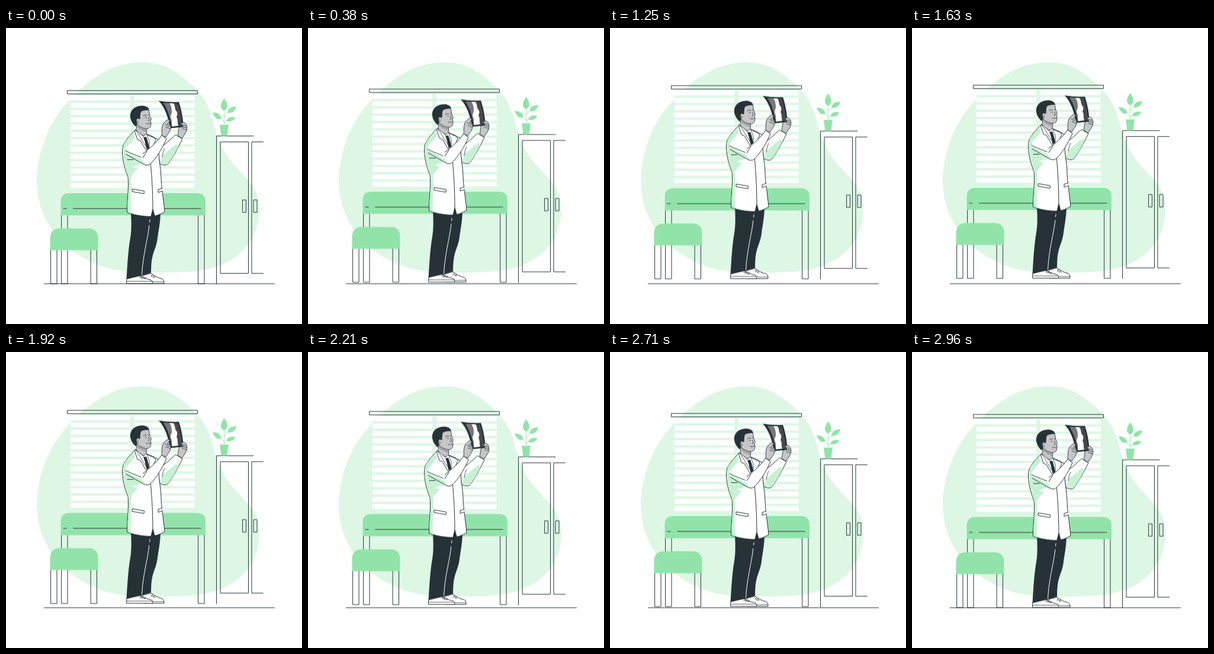
An HTML page for the animation above (3 s loop, 500 by 500 pixels).

```html
<!DOCTYPE html>
<html lang="en">
<head>
<meta charset="utf-8">
<title>Doctor with film</title>
<style>
  html, body { margin: 0; width: 100%; height: 100%; overflow: hidden; background: #fff; }
  svg { display: block; width: 100vw; height: 100vh; }
  .float { animation: float 3s linear infinite; }
  @keyframes float { 50% { transform: translateY(-10px); } }
  .pale { fill: #def7e5; }
  .shade { fill: #c8f1d4; }
  .green { fill: #92e3a9; }
  .dark { fill: #263238; }
  .white { fill: #fff; }
  .line { fill: none; stroke: #263238; stroke-linecap: round; stroke-linejoin: round; }
  .box { fill: #fff; stroke: #263238; stroke-linejoin: round; }
  .skin { fill: #c6c6c8; stroke: #263238; stroke-width: .9; stroke-linejoin: round; }
  .stem { fill: none; stroke: #b8ecc6; stroke-width: 1.1; }
  .thin { stroke-width: .8; }
</style>
</head>
<body>
<svg viewBox="0 0 500 500">
  <defs>
    <pattern id="slats" x="109" y="113.6" width="210" height="12.35" patternUnits="userSpaceOnUse">
      <rect width="210" height="8.2" fill="#fff"/>
    </pattern>
  </defs>

  <path class="pale" d="M230 58C263 58 281 69 301 85C330 109 342 127 350 158C357 190 369 213 389 235C409 257 428 272 428 305C428 344 410 379 367 399C337 412 302 413 262 413C219 413 180 413 146 396C112 380 91 361 77 340C61 315 52 290 52 256C53 214 69 164 100 130C134 91 175 58 230 58Z"/>
  <path class="line" d="M64.500 432H453.500"/>

  <g class="float">
  <g transform="translate(0 .4)">
    <!-- window -->
    <path class="pale" d="M109 112H318.500V270H109Z"/>
    <path fill="url(#slats)" d="M109 113H318.500V270H109Z"/>
    <path class="pale" d="M210 112H217V270H210Z"/>
    <path class="line" d="M104 105.300H323.500V111H104Z"/>

    <!-- cabinet -->
    <path class="line" d="M418 182H355.500V432M362.500 192H409.500V414H362.500ZM434.500 192H415V414H434.500M400 290H405.500V311H400ZM418.500 290H424V311H418.500Z"/>

    <!-- plant -->
    <path class="stem" d="M368.500 164V137M368.500 160Q367 154 361 151M368.500 152Q369 145 376 141M368.500 161Q370 157 375 155"/>
    <g class="green">
      <path d="M361 163H376L373.500 182H363.500Z"/>
      <path d="M368.500 118.500C372 123 374 127 373.700 131C373.500 136 371 138 368.500 139C365.500 138 363 135 363 131C363 127 365.500 123 368.500 118.500Z"/>
      <path d="M349 142.500C357 142 363 146 363.500 153C356 155 352 150 349 142.500Z"/>
      <path d="M389 132.500C387 140 382 144 374.500 142.500C374.500 136 380 132 389 132.500Z"/>
      <path d="M387.500 150.500C384 157 378 159 372 156.500C374 150.500 380 148.500 387.500 150.500Z"/>
    </g>

    <!-- table and stool -->
    <path class="line" d="M94 315H104V431.600H94ZM325 315H335V431.600H325Z"/>
    <path class="green" d="M92.500 316V293Q92.500 278.500 107 278.500H322.500Q337 278.500 337 293V316Z"/>
    <path class="line" d="M97 304.600H102M113.500 304.600H329"/>
    <path class="line" d="M76 374H86V431.600H76ZM143.500 374H153.500V431.600H143.500Z"/>
    <path class="green" d="M74.500 375V355Q74.500 338 91.500 338H139Q155.500 338 155.500 355V375Z"/>

    <!-- shoes -->
    <path class="box" d="M229 418L245 414C250 418 256 421.500 263 423C266 424 267 427 267 431.300H232Z"/>
    <path class="box" d="M204 423L226 417C231 421 237 423.500 244 425C247 426 248 428 247.500 431.300H203.500Q203 427 204 423Z"/>
    <path class="line thin" d="M203.500 427.500H247.500M248 428.500H267M226 421.500L229 418M229 423L232 419M233 424L236 420.500M245 419.500L248 416M248.500 421.500L251 418M226 420L235 423.500M245 417.500L252 421.500"/>

    <!-- trousers -->
    <path class="dark" d="M211 312C212 328 212 343 210 354C206 377 205 402 203.500 424Q215 421 229 418L245 413C245 399 246 391 248 383C251 373 255 365 256 354C258 340 260.500 328 261 312Z"/>
    <path fill="none" stroke="#fff" d="M243 323L242.500 328M241.800 333C240 355 231 383 229.500 417"/>

    <!-- far arm -->
    <path class="box" d="M256 205C266 198 278 189 286 180L298 187C290 203 281 220 273 230Q269 233 260 229Z"/>
    <path class="shade" d="M260 228L264 215L288 195L291 200C285 212 279 222 273 229.500Q268 232 260 228Z"/>
    <path class="line thin" d="M264 217Q265 208 268 203"/>

    <!-- coat -->
    <path class="box" d="M218 172C211 180 202 188 198 198C194 208 198 232 206 251C208 270 204 292 204.500 311C215 315 230 318 245 318L248 306L251 317C257 316 263 313 268 310C266 288 262 266 262 252C262 238 258 224 258 208L257 188L236 179Z"/>
    <path class="shade" d="M215 177C208 184 201 190 198.500 198C195 209 199 232 206.500 250C209 268 205 290 205 310.500L211 312.500C210 289 212 270 211 250L223 236L214 234L230 228L203 213L202 203L218 184Z"/>
    <path class="dark" d="M244.500 318L248 305L251.500 317Z"/>
    <path class="line" d="M242 207C246 240 248 275 248 306"/>
    <path class="box" d="M213 271.500L233.500 275L233 279.500L213 276ZM264 270.500L257 272.500V277.500L264.500 275"/>

    <!-- neck, shirt and tie -->
    <path class="skin" d="M221 160C221 166 220 170 219 173L232 182L237 180L238 167Z"/>
    <path fill="#a3a3a6" d="M222 163C226 168 232 170.500 237.500 171L237 175C231 174 225 170 221.500 167Z"/>
    <path class="box thin" d="M219 171L232 183L237 178L242 190V207L232 193Z"/>
    <path class="dark" d="M232 184L237 183.500L239 189L242.500 203L238 207L234.500 191Z"/>
    <path class="line" d="M217 173L222 188L227 190L237 207M238 179L250 184L253 189L244 207"/>

    <!-- near arm -->
    <path class="white" d="M202 207L226 213C240 205 254 194 263 180.500L271 187C263 205 253 221 245 228Q240 233 233 229L203 212Z"/>
    <path class="shade" d="M203 209L229 222L236 229L231 228L203 214Z"/>
    <path class="line" d="M202 207C212 212 221 215 228 218M205 222H215M203 213L232 229.500Q240 234 245 228C253 220 263 205 271 187L263 180.500C255 193 243 203 231 212M231 219L238 208"/>

    <!-- head -->
    <path class="skin" d="M222 142C228 138 238 137 241 137.500C242.500 142 242 147 243.500 149L245.500 154L244 156.500C245.500 160 245 164 243.500 167C241 170.500 235 170.500 230 168C225 166 221 163 220 158Z"/>
    <path class="dark" d="M219 166C212 160 208 150 210.500 143C213 134 224 129.800 233 131C239 132 242 135.500 241.500 138.500C237 138 231 139 228 141C226 146 227.500 150 226 154C222 151 218 154 221 158C222 161 221 164 219 166Z"/>
    <path class="line thin" d="M232 148Q235 145.500 237.500 147M240 146.500H242M235 150.500L237.500 151M240.800 150.500L242 155.500L240 156.500M237 161Q240 162.500 244 160.500M222 156Q224 157 223 160"/>

    <!-- film -->
    <path class="dark" d="M258 122.500Q275 125.500 292 124.500C297 139 299 154 300 166.500L277 169C274 150 269 135 258 122.500Z"/>
    <path fill="#77777a" d="M266 126L290 127.500C294 140 296 153 297 164L280 166C277 149 273 137 266 126Z"/>
    <path fill="#48494c" d="M283 127L290 127.500C294 140 296 153 297 164L289 165Z"/>
    <path class="white" d="M276 126.500L283 127C286 131 285 136 287 139C291 143 289 147 288 150C291 154 289 160 291 164.500L280.500 166C279.500 160 281 156 278.500 152C276.500 148 281 144 280 140C280 135 279 131 276 126.500Z"/>

    <!-- hands -->
    <path class="skin" d="M263 181C264 174 262 167 266 161C269 157 273 153 276 155C277.500 157 274 159 272.500 162L277 163C279 165 278 168 278 170C277 175 273 179 270 184Z"/>
    <path class="line thin" d="M269 162L273 165L278 165.500M270 167L277 169.500"/>
    <path class="skin" d="M290 181L292 170L292 167.500L299 166L296 161.500C298 158 302 159 303 161C306 163 306.500 168 305 173C303 178 300 182 297 186Z"/>
    <path class="line thin" d="M298 163L304 165M298 167L305.500 168M298 170L305 171.500"/>
  </g>
  </g>
</svg>
</body>
</html>
```
